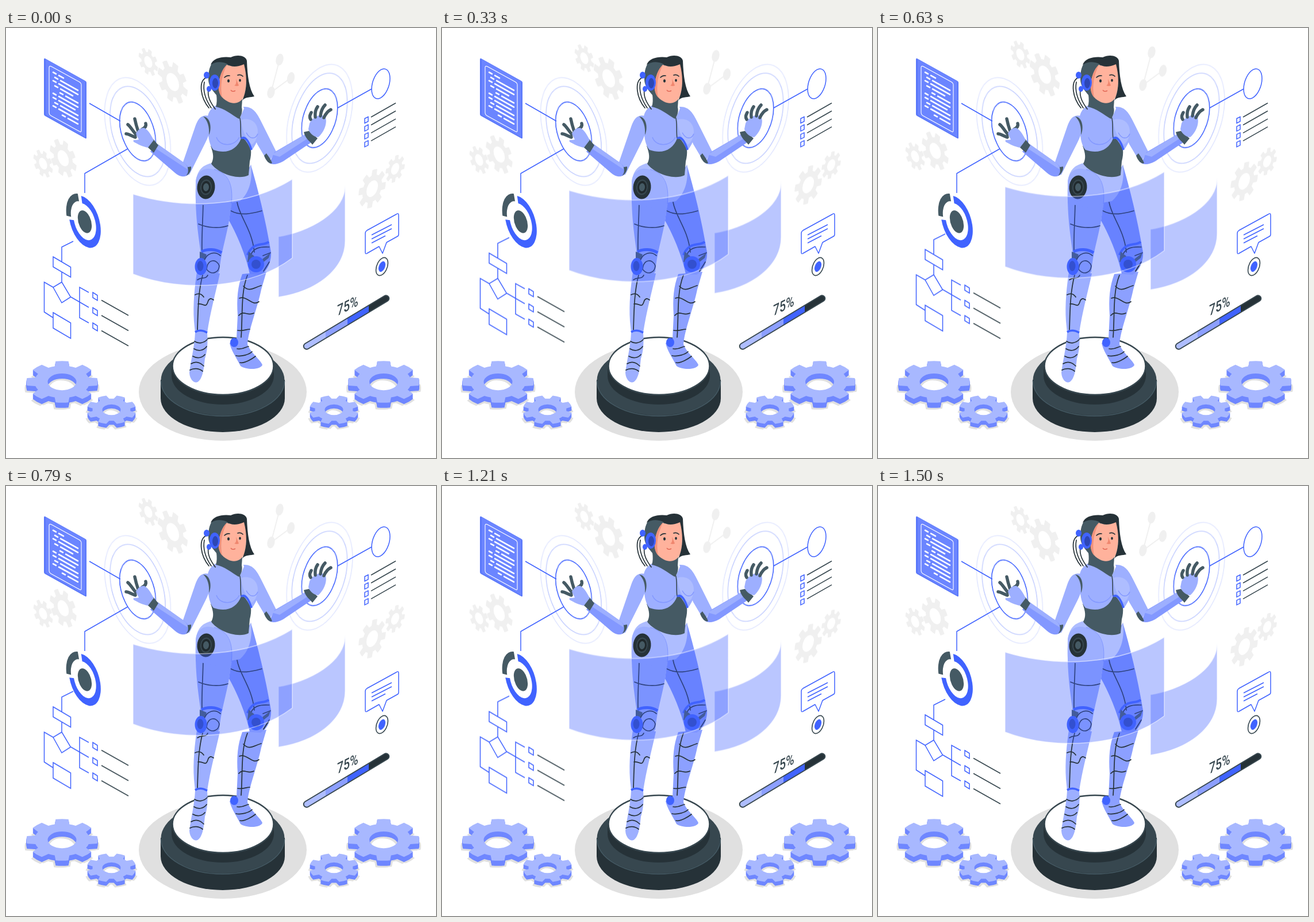
An HTML page for the animation above (1540 ms loop, 748 by 748 pixels).

```html
<!DOCTYPE html>
<html lang="en">
<head>
<meta charset="utf-8">
<title>Robot assistant</title>
<style>
  html, body { margin: 0; width: 100%; height: 100%; overflow: hidden; background: #fff; }
  svg { display: block; width: 100vw; height: 100vh; }
  path, circle, ellipse { vector-effect: non-scaling-stroke; }
  .float { animation: float 1540ms linear infinite; }
  @keyframes float {
    0%, 1.3% { transform: translateY(0); }
    47.8% { transform: translateY(-14.96px); }
    97.4%, 100% { transform: translateY(0); }
  }
  .line { fill: none; stroke: #4063ff; stroke-width: 1.5; }
  .ink { fill: none; stroke: #37474f; stroke-width: 1.6; }
  .seam { fill: none; stroke: #263238; stroke-width: 1.7; stroke-linecap: round; }
  .round { stroke-linecap: round; stroke-linejoin: round; }
  .blue { fill: #4063ff; }
  .navy { fill: #2d47b5; }
  .body { fill: #9dafff; }
  .light { fill: #aebdff; }
  .shade { fill: #8398ff; }
  .slate { fill: #455a64; }
  .dark { fill: #263238; }
  .mid { fill: #37474f; }
  .pale { fill: #f0f0f0; }
  .finger { fill: none; stroke: #455a64; stroke-width: 5.5; stroke-linecap: round; }
</style>
</head>
<body>
<svg viewBox="0 0 748 748">
  <defs>
    <linearGradient id="bar" gradientUnits="userSpaceOnUse" x1="517" x2="667" y1="0" y2="0">
      <stop offset=".26" stop-color="#aebdff"/><stop offset=".26" stop-color="#8c9fff"/>
      <stop offset=".513" stop-color="#8c9fff"/><stop offset=".513" stop-color="#4063ff"/>
      <stop offset=".76" stop-color="#4063ff"/><stop offset=".76" stop-color="#263238"/>
    </linearGradient>
  </defs>

  <g class="float">
    <g id="pale" class="pale"></g>
    <path d="M476 55L461 112L495 87" fill="none" stroke="#f0f0f0" stroke-width="2"/>
    <g class="pale">
      <ellipse cx="476" cy="55" rx="6.5" ry="10.5" transform="rotate(12 476 55)"/>
      <ellipse cx="495.5" cy="87" rx="6.5" ry="10.5" transform="rotate(12 495 87)"/>
      <ellipse cx="461" cy="112" rx="6.5" ry="10.5" transform="rotate(12 461 112)"/>
    </g>
  </g>

  <!-- document -->
  <path d="M68 53L138 92Q140 93 140 95V191Q140 193 138 192L68 153Q66 152 66 150V55Q66 52 68 53Z" fill="#5a78fa"/>
  <path d="M69 54L138 93V190L69 151Z" fill="#6b85ff"/>
  <path d="M79 67L128 94Q131 96 131 99V178Q131 182 128 180L79 153Q75 151 75 147V69Q75 65 79 67Z" fill="none" stroke="#fff" stroke-width="1.1"/>
  <g id="rows" transform="matrix(1 .56 0 1 82 77)" stroke="#fff" stroke-width="2.6" stroke-linecap="round" fill="none"></g>

  <!-- dials -->
  <g transform="matrix(.58 .335 0 .885 229 180)" class="line">
    <circle r="99" stroke="#e2e7ff"/><circle r="83" stroke="#c6d0ff"/><circle r="54"/>
  </g>
  <g transform="matrix(.58 -.335 0 .885 545.5 157)" class="line">
    <circle r="99" stroke="#e2e7ff"/><circle r="83" stroke="#c6d0ff"/><circle r="54"/>
  </g>
  <path class="line" d="M145 131L199 162M212 210L137 253V287M577 139L636 106"/>
  <circle class="line" r="27.5" transform="matrix(.58 -.335 0 .885 652 97)"/>

  <!-- checklist -->
  <g id="checks"></g>

  <!-- donut -->
  <g transform="matrix(.58 .335 0 .885 137 337)">
    <path id="ring" class="blue"/>
    <circle r="21" class="slate"/>
  </g>
  <path id="slice" class="slate" transform="matrix(.58 .335 0 .885 132.5 333.5)"/>

  <!-- flowchart -->
  <g class="float">
    <path class="line" d="M117 371L97 381V406M82 398L112.500 416V433.500L82 415.500ZM97 425V442L112.500 468L97 478L82 451L97 442M82 451L66.500 442V494L82 504M82 495L112.500 513V540L82 522ZM113 468L144 486M144 460L128 451V504L144 513"/>
    <g id="items"></g>
  </g>

  <!-- message -->
  <path class="line round" d="M628 352L679 324Q683 321 683 326V359Q683 362 680 363L662 373L655 392L649 380L628 392Q625 394 625 390V357Q625 354 628 352Z"/>
  <path class="line" d="M636 360L671 342M636 367L671 349M636 374L660 361.500"/>
  <g transform="matrix(.58 -.335 0 .8 654 415)">
    <circle class="ink" r="18"/><circle class="blue" r="10.500"/>
  </g>

  <!-- progress -->
  <path d="M523 553.500L661 470.500" stroke="#37474f" stroke-width="12.500" stroke-linecap="round"/>
  <path d="M523 553.500L661 470.500" stroke="url(#bar)" stroke-width="8.500" stroke-linecap="round"/>
  <text transform="matrix(.75 -.38 0 1 576 501)" font-family="Roboto, sans-serif" font-size="26" font-weight="500" fill="#37474f">75%</text>

  <!-- pedestal -->
  <ellipse cx="377" cy="633" rx="146" ry="85" fill="#e0e0e0"/>
  <path class="dark" d="M269 612V644A108 59 0 0 0 485 644V612Z"/>
  <ellipse cx="377" cy="613" rx="107.500" ry="61" class="mid"/>
  <path d="M269.500 614A107.500 61 0 0 0 484.500 614" fill="none" stroke="#455a64" stroke-width="1.500"/>
  <path class="dark" d="M288 587V605A89 50 0 0 0 466 605V587Z"/>
  <ellipse cx="377.500" cy="588" rx="88" ry="50" fill="#fff" stroke="#37474f" stroke-width="2.500"/>

  <g id="gears"></g>

  <!-- right leg -->
  <path fill="#8ca0ff" d="M411 428C403 450 401 470 403 500L401 540L389 548C391 560 401 574 408 588C418 595 443 595 446 586C442 576 426 566 420 550C422 525 438 485 444 455L453 424Z"/>
  <path fill="#7f95ff" d="M426 238C438 280 451 330 461 390C462 405 455 423 443 429L424 428C420 405 405 365 388 335L394 290Z"/>
  <path class="seam" d="M402 303C406 328 428 350 432 390M391 318C410 328 430 322 445 318M420 430C408 460 412 500 409 538M413 449C423 460 430 452 444 448M406 470C420 465 428 485 440 476M405 500C414 490 420 502 431 496M403 526C411 528 418 524 424 524M402 558C412 560 418 554 422 554M400 570C410 572 423 568 428 563M407 582C415 584 429 575 434 571"/>
  <path d="M420 395C430 370 448 380 457 372" fill="none" stroke="#4063ff" stroke-width="4"/>
  <path d="M424 400C428 382 442 380 458 381M447 396L460 391M448 423L458 407" class="seam"/>
  <path class="slate" d="M422 389L432 397L427 409L420 407ZM446 402L460 391L457 400L448 407Z"/>
  <circle cx="435" cy="411" r="14" class="blue"/><circle cx="435" cy="411" r="8" class="navy"/>
  <ellipse cx="397" cy="547" rx="7" ry="8" class="blue"/>

  <!-- left leg -->
  <path class="body" d="M333 418C328 450 325 480 327 510L329 530C328 555 321 580 319 600C320 613 328 618 333 616C342 611 344 594 346 575C351 560 351 545 350 530C355 495 365 460 372 427Z"/>
  <path class="body" d="M345 240C331 250 329 270 330 300C331 345 337 375 340 400L334 425C345 432 360 435 371 424C374 390 383 365 388 335L396 285Z"/>
  <path class="seam" d="M343 297C343 330 340 360 341 390M335 341C351 348 371 349 386 344M342 430C334 460 334 495 333 525M333 438C341 432 347 438 351 430M329 464C335 461 340 462 344 468M334 480C345 478 347 490 352 474C355 469 358 471 361 473M328 545C335 550 344 548 350 542M327 558C335 563 344 561 349 554M325 571C334 576 342 573 346 568M322 584C330 579 338 582 344 588M320 595C327 591 336 592 342 597"/>
  <path d="M329 529C335 525 343 526 350 530" fill="none" stroke="#4063ff" stroke-width="3.500"/>
  <path d="M340 389C350 384 365 384 375 391" fill="none" stroke="#4063ff" stroke-width="5"/>
  <path class="slate" d="M337 389L349 394L346 404L337 402Z"/>
  <path class="seam" d="M344 408C348 390 364 388 373 396M349 420C350 400 368 402 371 414C370 426 358 430 350 421"/>
  <ellipse cx="339" cy="415" rx="10.500" ry="15" class="blue"/><ellipse cx="338" cy="414" rx="5.500" ry="9" class="navy"/>

  <!-- pelvis -->
  <path class="light" d="M358 235C338 239 331 252 330 272C350 270 365 280 372 305C384 306 396 303 407 301C420 290 430 270 426 237L420 255Z"/>
  <path class="body" d="M330 268C331 250 345 241 360 246C383 250 395 270 393 303L375 315L330 305Z"/>
  <path d="M362 246C386 252 396 272 392 306" fill="none" stroke="#7f95ff" stroke-width="1"/>
  <g transform="rotate(5 348 277)">
    <ellipse cx="348" cy="277" rx="15.500" ry="20.500" class="dark"/>
    <ellipse cx="348" cy="277" rx="10" ry="13.500" fill="#37474f"/>
    <ellipse cx="348" cy="277" rx="8" ry="11" fill="#20292d"/>
    <ellipse cx="348" cy="277" rx="5" ry="7" class="slate"/>
  </g>

  <!-- right arm -->
  <path class="body" d="M413 137C430 136 437 149 444 163L470 215L456 234L437 202L425 170Z"/>
  <path class="shade" d="M467 216L522 184L531 199L482 232C471 238 463 238 458 235Z"/>
  <path class="body" d="M462 220L519 186L525 192L476 224Z"/>
  <path class="slate" d="M453 218C457 224 460 227 463 235C458 238 451 229 449 222ZM518 181L527 179L542 192L533 203C528 196 521 193 518 181Z"/>
  <path class="body" d="M528 166C532 157 545 148 555 154C560 163 554 181 543 190C535 190 527 181 526 176Z"/>
  <path class="finger" d="M530 159C527 154 529 151 531 147M538 155C537 146 539 141 542 137M547 153C548 143 551 138 555 134M553 156C556 149 559 145 565 142"/>

  <!-- torso -->
  <path class="slate" d="M356 205L407 190L419 190C427 203 428 218 424 232L422 256C402 266 367 251 357 236C362 227 361 219 356 205Z"/>
  <path class="body" d="M365 135C384 139 400 148 407 156L415 138C431 144 440 162 440 178C440 194 433 206 427 213C420 200 415 190 409 192C402 212 383 220 361 212C355 206 351 191 352 177C348 158 350 143 365 135Z"/>
  <path class="light" d="M409 160C425 155 438 164 438 181C437 194 432 199 428 203C420 195 411 183 409 160Z"/>
  <path d="M366 190C372 207 397 207 406 190M418 182C424 194 434 194 438 184" fill="none" stroke="#8398ff" stroke-width="1.500"/>
  <path class="ink" d="M406 154C410 164 407 178 409 192"/>
  <path d="M409 192C417 187 423 199 427 212" fill="none" stroke="#4063ff" stroke-width="3.500"/>

  <!-- left arm -->
  <path class="body" d="M353 153C339 149 333 160 329 172L307 236C300 247 309 259 319 255L347 199C355 184 358 167 353 153Z"/>
  <path class="slate" d="M343 154C357 155 358 177 353 186C354 172 351 161 343 154Z"/>
  <path class="shade" d="M262 201L309 234C318 240 322 249 316 256C308 261 300 257 294 252L251 215Z"/>
  <path class="body" d="M264 202L309 234C314 238 316 241 316 246L258 208Z"/>
  <path class="slate" d="M316 242L322 241C323 248 318 255 313 257C318 252 317 247 316 242ZM256 193L265 204L257 217L246 207Z"/>
  <path class="finger" d="M225 190C218 188 213 184 209 184M226 185C220 178 216 171 212 168M230 180C227 171 225 163 224 158M237 176C243 173 244 169 243 166"/>
  <path class="body" d="M226 184C229 177 235 173 241 174C248 178 253 187 257 195L247 208C239 207 229 202 222 198C220 193 225 196 231 194Z"/>

  <!-- head -->
  <path class="seam" d="M347 87C335 94 338 121 353 139M345 94C342 110 348 126 357 139M352 107C350 120 356 130 364 141"/>
  <path class="slate" d="M366 116L411 124L410 138C412 145 409 154 405 158C393 151 380 140 365 137C367 131 367 124 366 116Z"/>
  <path class="slate" d="M358 62C373 54 384 57 389 66L382 127L369 121C364 112 352 105 352 88C352 76 354 68 358 62Z"/>
  <path fill="#ffb29c" d="M384 64C397 69 410 66 416 60C419 84 419 103 414 119C409 130 397 134 386 128C374 122 370 113 370 101C371 84 376 72 384 64Z"/>
  <path fill="#f0927c" d="M384 64C376 82 372 99 376 121C370 114 369 105 370 97C372 83 376 72 384 64Z"/>
  <path class="dark" d="M356 64C360 52 377 49 391 51C401 46 417 47 419 57C420 84 423 106 432 119C426 121 417 119 411 126C419 109 420 86 414 63C401 69 390 68 384 62C375 58 364 58 356 64Z"/>
  <path d="M380 86Q384 82 389 83M403 82Q408 80 412 84" class="seam"/>
  <ellipse cx="387" cy="92" rx="2" ry="2.800" class="dark"/><ellipse cx="407" cy="91" rx="1.800" ry="2.600" class="dark"/>
  <path fill="#f0876f" d="M400 88L405 100Q402 102 397 100Q402 98 400 88Z"/>
  <path d="M391 108Q394 112 399 109" fill="none" stroke="#e36b5a" stroke-width="1.600"/>
  <ellipse cx="349" cy="82" rx="5" ry="6" class="blue"/><ellipse cx="353" cy="106" rx="4" ry="5" class="blue"/>
  <ellipse cx="363" cy="95" rx="9" ry="14" class="blue"/><ellipse cx="364" cy="96" rx="5" ry="9" class="navy"/>

  <!-- screens -->
  <g class="float" fill="#4063ff" fill-opacity=".36" stroke="#fff" stroke-opacity=".55" stroke-width="1.500">
    <path d="M474 363C525 355 590 322 590 273V370C590 420 540 458 474 468Z"/>
    <path d="M221 289C310 316 420 312 498 263V400C430 452 310 462 221 428Z"/>
  </g>
</svg>
<script>
const $ = id => document.getElementById(id);
const polar = (r, a) => `${(r * Math.cos(a)).toFixed(2)} ${(r * Math.sin(a)).toFixed(2)}`;

function gear(R, r, hole, phase = 0, root = .27, tip = .18) {
  let d = '';
  for (let i = 0; i < 8; i++) {
    const a = phase + i * Math.PI / 4;
    d += `${i ? `A${r} ${r} 0 0 1 ` : 'M'}${polar(r, a - root)}L${polar(R, a - tip)}` +
      `A${R} ${R} 0 0 1 ${polar(R, a + tip)}L${polar(r, a + root)}`;
  }
  return `${d}ZM${hole} 0A${hole} ${hole} 0 1 0 ${-hole} 0A${hole} ${hole} 0 1 0 ${hole} 0Z`;
}

// Flat gears: x, y, radius, skew direction
$('pale').innerHTML = [
  [99.5, 226.5, 40, 1], [64.5, 236, 29, 1], [290, 94, 45, 1],
  [247.5, 59, 29, 1], [637, 279.5, 41, -1], [677, 245, 29, -1]
].map(([x, y, R, s]) =>
  `<path fill-rule="evenodd" transform="matrix(.58 ${s * .3} 0 .78 ${x} ${y})" d="${gear(R, R * .72, R * .42, .2)}"/>`
).join('');

// Solid gears lying on the floor
function solidGear(x, y, R, r, hole, h, phase) {
  const d = gear(R, r, hole, phase);
  const layer = (dx, dy, fill) =>
    `<path fill-rule="evenodd" fill="${fill}" transform="matrix(1 0 0 .585 ${x + dx} ${y + dy})" d="${d}"/>`;
  let out = layer(-3, h + 3, '#e0e0e0') + layer(3, h + 2, '#e0e0e0');
  for (let i = h; i > 0; i--) out += layer(0, i, '#6f87ff');
  return out + layer(0, 0, '#a8b8ff');
}
$('gears').innerHTML = [97.5, 657].map(x => solidGear(x, 615.5, 62, 48, 25, 9, 0)).join('') +
  [183.5, 570.5].map(x => solidGear(x, 664, 43, 33, 16, 7, Math.PI / 8)).join('');

// Donut pieces
const sector = (from, to) => {
  const a = from * Math.PI / 180, b = to * Math.PI / 180, big = +(to - from > 180);
  return `M${polar(48, a)}A48 48 0 ${big} 1 ${polar(48, b)}L${polar(34, b)}A34 34 0 ${big} 0 ${polar(34, a)}Z`;
};
$('ring').setAttribute('d', sector(-103, 164));
$('slice').setAttribute('d', sector(168, 254));

// Document text: a short mark, then a longer run
$('rows').innerHTML = Array.from({ length: 10 }, (_, i) => {
  const start = [0, 3, 0, 3, 12, 0, 0, 3, 0, 16][i], end = [18, 43, 43, 34, 43, 43, 38, 43, 43, 43][i];
  return `<path d="M${start} ${i * 7.3}h5M${start + 10} ${i * 7.3}H${end}"/>`;
}).join('');

$('checks').innerHTML = [0, 1, 2, 3].map(i => {
  const y = i * 13.8;
  return `<path class="line" d="M624 ${y + 157.5}L630 ${y + 154.5}V${y + 162.5}L624 ${y + 165.5}Z"/>` +
    `<path class="ink" d="M635 ${y + 155}L678 ${y + 130.5}"/>`;
}).join('');

$('items').innerHTML = [0, 1, 2].map(i => {
  const y = i * 26.5;
  return `<path class="line" d="M151 ${y + 460}L159 ${y + 465}V${y + 474}L151 ${y + 469}Z"/>` +
    `<path class="ink" d="M166 ${y + 473.500}L213 ${y + 500}"/>`;
}).join('');
</script>
</body>
</html>
```
